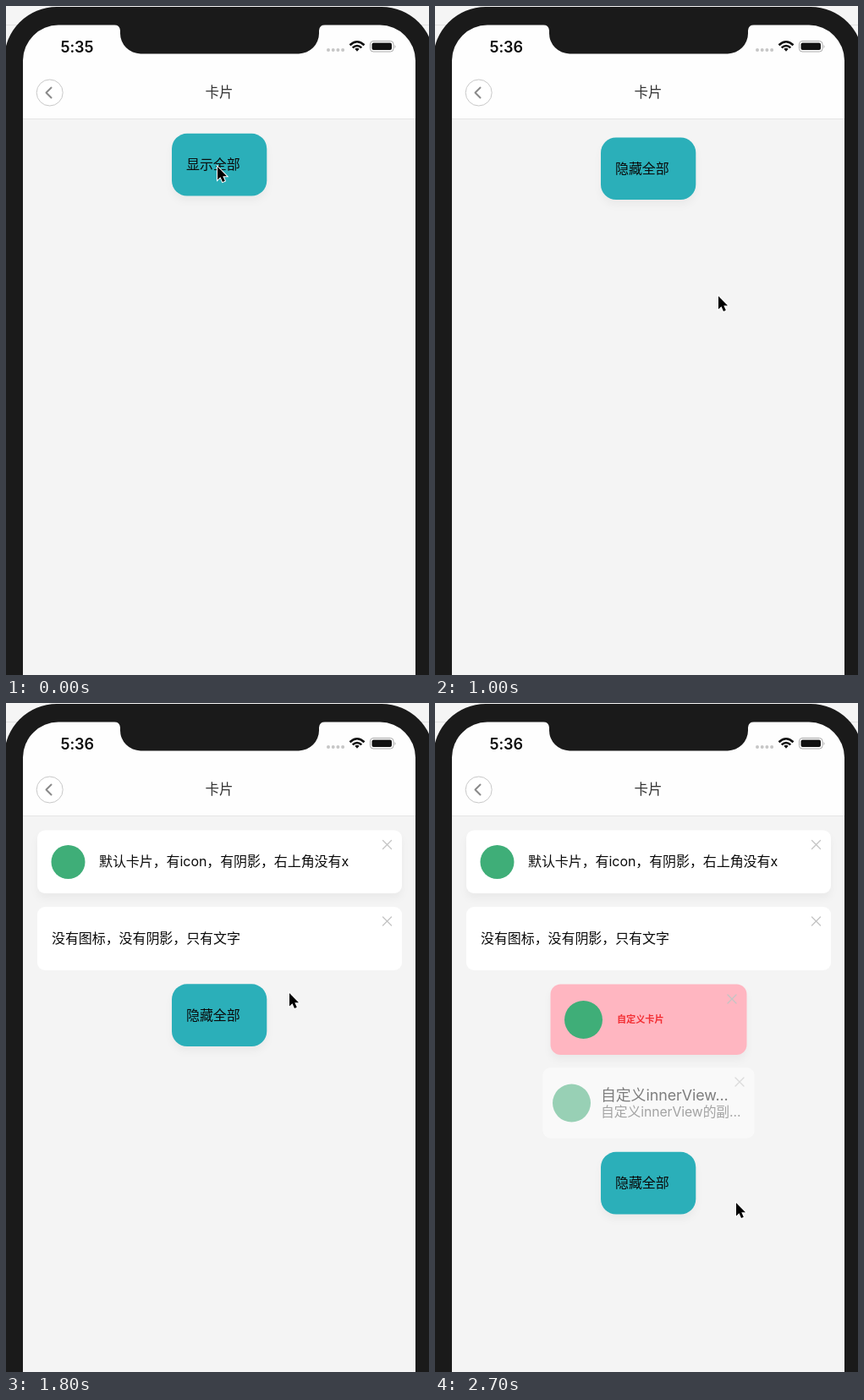
Recreate the animation shown at these times as an HTML page. Size 500 by 791 pixels, loop 2800 ms.

```html
<!DOCTYPE html>
<html lang="zh-CN">
<head>
<meta charset="utf-8">
<title>卡片</title>
<style>
  html, body { margin: 0; width: 100%; height: 100%; overflow: hidden; background: #f5f5f5; }
  svg { display: block; width: 100%; height: 100%; }
  text { font: 16px Inter, "Noto Sans CJK SC", "Noto Sans CJK", sans-serif; letter-spacing: -.08px; fill: #0a0a0a; }
  .shadow { filter: drop-shadow(0 6px 4px rgba(0, 0, 0, .04)); }
  .line { fill: none; stroke-linecap: round; stroke-linejoin: round; }
  .card { opacity: 0; }
</style>
</head>
<body>
<svg viewBox="0 0 500 791">
  <defs>
    <path id="cross" class="line" stroke="#c4c4c4" stroke-width="1.3" d="M-5-5 5 5M5-5-5 5"/>
  </defs>

  <!-- Phone and screen -->
  <path d="M0 22.5H500" stroke="#e2e2e2"/>
  <rect x="-2" y="1" width="508" height="900" rx="62" fill="#1a1a1a"/>
  <rect x="20" y="22.6" width="464" height="900" rx="42" fill="#fefefe"/>
  <rect x="20" y="133" width="464" height="658" fill="#f4f4f4"/>
  <path d="M20 133.5H484" stroke="#e6e6e6"/>
  <path d="M128 22A7 7 0 0 1 135 29V32.400A24 24 0 0 0 159 56.400H346A24 24 0 0 0 370 32.400V29A7 7 0 0 1 377 22Z" fill="#1a1a1a"/>

  <!-- Status bar -->
  <text id="clock" x="64.5" y="54.5" style="font-size:18px;font-weight:600"></text>
  <path class="line" d="M381 52H399" stroke="#c6c6c6" stroke-width="4" stroke-dasharray="0 5.7"/>
  <g class="line" stroke="#111" stroke-width="2.6" style="stroke-linecap:butt">
    <path d="M406.5 46.3Q415 38.2 423.5 46.3M409.7 49.4Q415 44.6 420.3 49.4"/>
    <path d="M412.3 50.8Q415 48.7 417.7 50.8L415 53.7Z" fill="#111" stroke="none"/>
  </g>
  <rect x="430.5" y="41.5" width="27.5" height="12.5" rx="3.5" fill="none" stroke="#aaa"/>
  <rect x="432.5" y="43.5" width="23.5" height="8.5" rx="2" fill="#111"/>
  <path d="M459.5 46V50Q461.5 48 459.5 46Z" fill="#aaa"/>

  <!-- Header -->
  <circle cx="51.7" cy="102.5" r="15.5" fill="#fff" stroke="#c8c8c8"/>
  <path class="line" d="M53.5 96.5 47.5 102.5 53.5 108.5" stroke="#8a8a8a" stroke-width="2"/>
  <text x="252" y="108.3" text-anchor="middle" style="font-size:16.5px;font-weight:500;fill:#333">卡片</text>

  <!-- Cards -->
  <g class="card">
    <rect class="shadow" x="37" y="150.5" width="431" height="74.5" rx="9" fill="#fff"/>
    <circle cx="73.5" cy="188" r="20" fill="#3fae78"/>
    <text x="110" y="193">默认卡片，有icon，有阴影，右上角没有x</text>
    <use href="#cross" x="450.5" y="167.5"/>
  </g>
  <g class="card">
    <rect x="37" y="241" width="431" height="75" rx="9" fill="#fff"/>
    <text x="54" y="284">没有图标，没有阴影，只有文字</text>
    <use href="#cross" x="450.5" y="258"/>
  </g>
  <g class="card">
    <rect class="shadow" x="136.5" y="332.5" width="232" height="83.5" rx="12" fill="#ffb6c1"/>
    <circle cx="175.5" cy="374.5" r="22.5" fill="#3fae78"/>
    <text x="215" y="378.3" style="font-size:11.2px;font-weight:700;fill:#f33035">自定义卡片</text>
    <use href="#cross" x="351" y="350"/>
  </g>
  <g class="card">
    <rect x="127.5" y="431" width="250" height="83.5" rx="9" fill="#fff"/>
    <circle cx="161.5" cy="473" r="22.5" fill="#3fae78"/>
    <text x="196" y="469.5" style="font-size:17.9px">自定义innerView...</text>
    <text x="196" y="489" style="font-size:15.8px;fill:#555">自定义innerView的副...</text>
    <use href="#cross" x="360" y="448"/>
  </g>

  <g id="button">
    <rect id="face" x="196" y="150.8" width="112.3" height="73.7" rx="18"/>
    <text id="label" x="213" y="193"></text>
  </g>

  <path id="cursor" d="M0 0V15.5L3.5 12.2 6 18 8.8 16.8 6.3 11.2H11Z" fill="#000" stroke="#fff" stroke-width="2" paint-order="stroke"/>
</svg>

<script>
const LOOP = 2800, STEP = 100;
const $ = id => document.getElementById(id);
const cards = [...document.querySelectorAll('.card')];
const heights = [91, 90.5, 100.5, 98];   // card height plus margin
const firstCard = 970, cardGap = 500;
const cursorPath = [
  [0, 250, 190], [300, 258, 191], [500, 260, 192], [600, 262, 194],
  [700, 285, 232], [900, 333, 338], [1000, 335, 343], [1900, 335, 343],
  [2300, 347, 490], [2400, 347, 494], [2500, 348, 502], [2700, 356, 591]
];

const clamp = u => Math.min(1, Math.max(0, u));
const ease = u => u * u * (3 - 2 * u);

function cursorAt(t) {
  const i = cursorPath.findIndex(p => p[0] > t);
  if (i < 0) return cursorPath.at(-1).slice(1);
  const a = cursorPath[i - 1], b = cursorPath[i];
  const u = (t - a[0]) / (b[0] - a[0]);
  return [1, 2].map(k => a[k] + (b[k] - a[k]) * u);
}

function render(t) {
  let offset = 0;
  cards.forEach((card, i) => {
    const age = t - firstCard - i * cardGap;
    offset += heights[i] * ease(clamp(age / 220));   // make room first,
    card.style.opacity = clamp((age - 130) / 200);   // then fade in
  });
  const pressed = t >= 300 && t < 600;
  $('button').setAttribute('transform', `translate(0 ${offset})`);
  $('face').setAttribute('fill', pressed ? '#8b8b8b' : '#2bafb9');
  $('face').setAttribute('class', pressed ? '' : 'shadow');
  $('label').textContent = t < 500 ? '显示全部' : '隐藏全部';
  $('clock').textContent = t < 700 ? '5:35' : '5:36';
  $('cursor').setAttribute('transform', `translate(${cursorAt(t)})`);
}

const start = performance.now();
function tick() {
  const t = (performance.now() - start) % LOOP;
  render(Math.floor(t / STEP) * STEP);   // ten pictures a second
  requestAnimationFrame(tick);
}
tick();
</script>
</body>
</html>
```
